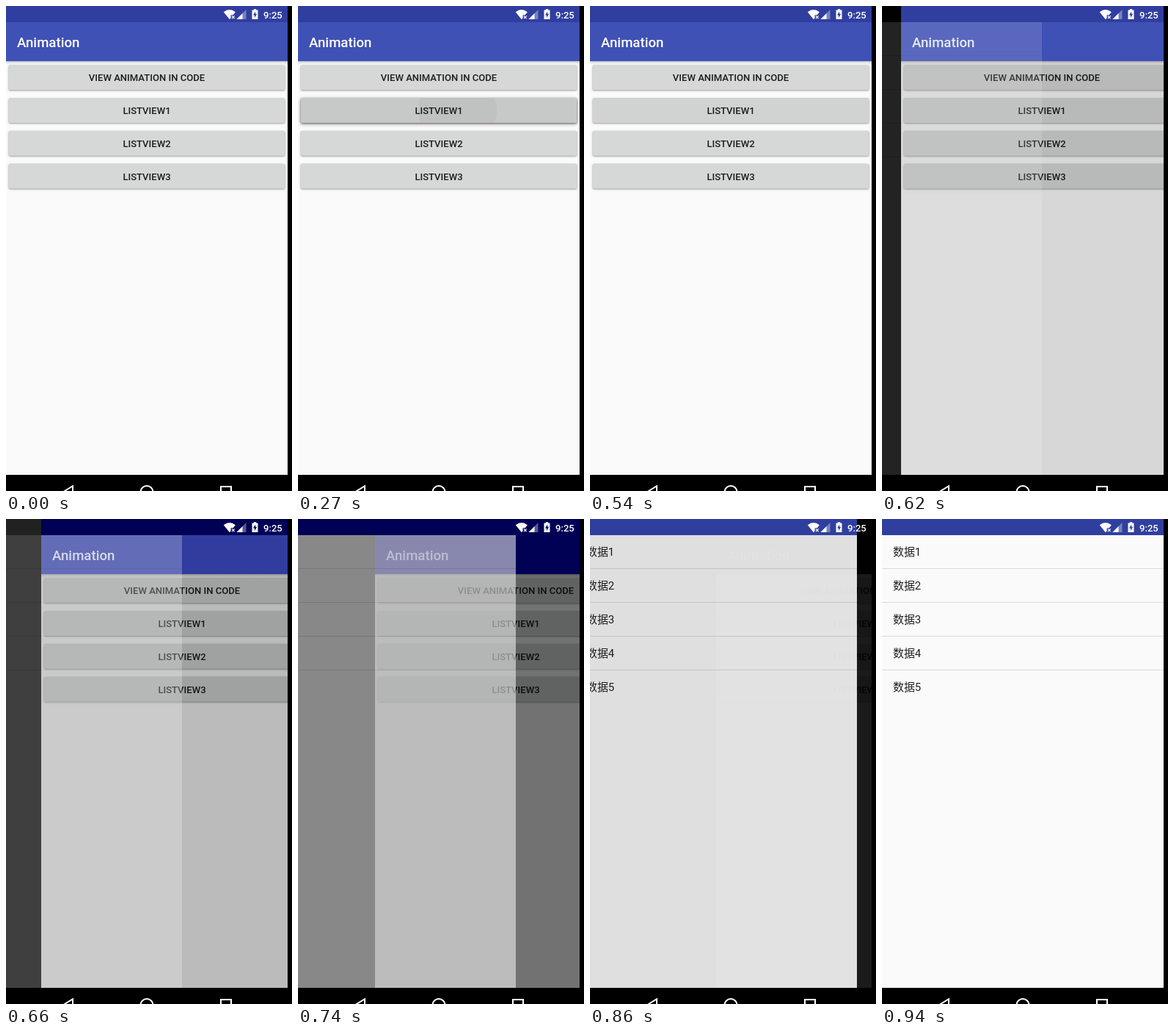
Animation, 390 px wide and 660 px high, one loop 1920 ms. Source, as an HTML page:

```html
<!DOCTYPE html>
<html lang="zh">
<head>
<meta charset="utf-8">
<title>Activity slide</title>
<style>
  html, body { margin: 0; width: 100%; height: 100%; overflow: hidden; background: #000; }
  svg { display: block; }
  text { font-family: Roboto, "Noto Sans CJK SC", "Noto Sans CJK", sans-serif; }
  .label { font-size: 13.07px; font-weight: 500; fill: #1c1d1d; text-anchor: middle; }
  .title { font-size: 18.67px; font-weight: 500; fill: #fff; }
  .row { font-size: 14.93px; fill: #212121; }
  .clock { font-size: 13.07px; font-weight: 500; fill: #fff; }
</style>
</head>
<body>
<svg width="390" height="660" viewBox="0 0 390 660">
  <defs>
    <clipPath id="screen"><rect width="384" height="638"/></clipPath>
    <clipPath id="pressClip"><rect x="3.7" y="125" width="376.6" height="34" rx="2"/></clipPath>
    <linearGradient id="barShade" x2="0" y2="1">
      <stop offset="0" stop-opacity=".24"/>
      <stop offset=".45" stop-opacity=".08"/>
      <stop offset="1" stop-opacity="0"/>
    </linearGradient>
    <filter id="soft" x="-5%" y="-50%" width="110%" height="200%"><feGaussianBlur stdDeviation=".8"/></filter>
    <filter id="softer" x="-5%" y="-50%" width="110%" height="200%"><feGaussianBlur stdDeviation="2.6"/></filter>
  </defs>
  <g clip-path="url(#screen)">
    <g id="menu">
      <g id="menuBody">
        <rect y="22" width="384" height="616" fill="#fafafa"/>
        <rect y="75" width="384" height="5" fill="url(#barShade)"/>
        <rect id="lift" x="3.7" y="126.5" width="376.6" height="34" rx="2" filter="url(#softer)"/>
        <g id="buttons"></g>
        <g clip-path="url(#pressClip)">
          <rect id="press" x="3" y="124" width="378" height="36"/>
          <circle id="ripple" cx="217.5" cy="142"/>
        </g>
        <g id="labels"></g>
      </g>
      <rect id="bar" y="22" width="384" height="53"/>
      <text id="title" class="title" x="15" y="56">Animation</text>
    </g>
    <g id="list">
      <rect y="22" width="384" height="616" fill="#fafafa"/>
      <g id="rows"></g>
    </g>
    <rect id="statusL" height="22"/>
    <rect id="statusM" height="22"/>
    <rect id="statusR" height="22"/>
  </g>
  <g fill="#fff">
    <path d="M296.8 8.2Q304.8 2 312.9 8.2L309.6 12.3H306.6V16.2L304.9 18.2Z"/>
    <path d="M308 13.4l3.6 3.8m0-3.8l-3.6 3.8" stroke="#fff" stroke-width="1.2"/>
    <path d="M327.5 5V18H314.5Z" opacity=".35"/>
    <path d="M322.5 10V18H314.5Z"/>
    <path fill-rule="evenodd" d="M337.8 4.2h3.4v1.4h2.3v12.3h-8V5.6h2.3ZM340.2 7.6l-3.2 5h2v3.4l3.2-5.2h-2Z"/>
    <text class="clock" x="351" y="16.5">9:25</text>
  </g>
  <g fill="none" stroke="#fff" stroke-width="2">
    <path d="M91 653.2V673L75 663.1Z"/>
    <circle cx="192" cy="661.5" r="8.5"/>
    <rect x="293" y="654" width="14" height="14"/>
  </g>
</svg>
<script>
const LOOP = 1920, WIDTH = 384, SHIFT = 192;
const $ = id => document.getElementById(id);
const set = (id, attrs) => {
  for (const key in attrs) $(id).setAttribute(key, attrs[key]);
};

// Linear interpolation through [time, value] points
function ramp(t, points) {
  if (t <= points[0][0]) return points[0][1];
  for (let i = 1; i < points.length; i++) {
    const [t0, v0] = points[i - 1], [t1, v1] = points[i];
    if (t < t1) return v0 + (v1 - v0) * (t - t0) / (t1 - t0);
  }
  return points[points.length - 1][1];
}

// The blues darken in steps rather than smoothly
function shade(level, full, mid) {
  if (level > .85) return full;
  if (level > .5) return mid;
  if (level > .4) return "#000055";
  return level > .17 ? "#202221" : "#010101";
}

function build() {
  const names = ["VIEW ANIMATION IN CODE", "LISTVIEW1", "LISTVIEW2", "LISTVIEW3"];
  let buttons = "", labels = "", rows = "";
  names.forEach((name, i) => {
    const y = 80.2 + 44.8 * i;
    const box = `x="3.7" width="376.6" height="34" rx="2"`;
    buttons += `<rect ${box} y="${y + 1}" opacity=".38" filter="url(#soft)"/>
      <rect ${box} y="${y}" fill="#d6d7d7"/>`;
    labels += `<text class="label" x="192" y="${y + 22}">${name}</text>`;
  });
  for (let i = 0; i < 5; i++) {
    rows += `<text class="row" x="15" y="${50.2 + 45.9 * i}">数据${i + 1}</text>`;
    if (i < 4) rows += `<rect y="${67 + 46 * i}" width="384" height="1" fill="#dadada"/>`;
  }
  $("buttons").innerHTML = buttons;
  $("labels").innerHTML = labels;
  $("rows").innerHTML = rows;
}

function drawPress(t) {
  set("press", { opacity: ramp(t, [[120, 0], [230, .07], [360, .07], [540, .022], [620, 0]]) });
  set("ripple", {
    r: ramp(t, [[130, 8], [270, 53], [360, 110], [480, 220]]),
    opacity: ramp(t, [[130, 0], [200, .038], [360, .035], [500, 0]])
  });
  set("lift", { opacity: ramp(t, [[130, 0], [250, .4], [380, .4], [520, 0]]) });
}

function drawSlide(t) {
  const tick = 620 + Math.floor((t - 620) / 40) * 40;
  const p = t < 620 ? 0 : ramp(tick, [[620, .24], [660, .335], [780, .626], [860, .791], [940, 1]]);
  const fadeIn = .5 - .5 * Math.cos(Math.PI * p);
  const fadeOut = 1 - fadeIn;
  const x = Math.round(SHIFT * fadeIn), edge = SHIFT + x;

  set("menu", { transform: `translate(${x} 0)` });
  set("menuBody", { opacity: fadeOut });
  set("title", { opacity: fadeOut });
  set("bar", { fill: shade(fadeOut, "#3f51b5", "#303d9f") });
  set("list", { transform: `translate(${x - SHIFT} 0)`, opacity: fadeIn });

  const status = (id, from, to, level) =>
    set(id, { x: from, width: to - from, fill: shade(level, "#303f9f", "#000055") });
  status("statusL", 0, x, fadeIn);
  status("statusM", x, edge, fadeIn + fadeOut * fadeOut);
  status("statusR", edge, WIDTH, fadeOut);
}

function frame(now) {
  const t = Math.max(0, now - start) % LOOP;
  drawPress(t);
  drawSlide(t);
  requestAnimationFrame(frame);
}

build();
const start = performance.now();
frame(start);
</script>
</body>
</html>
```
